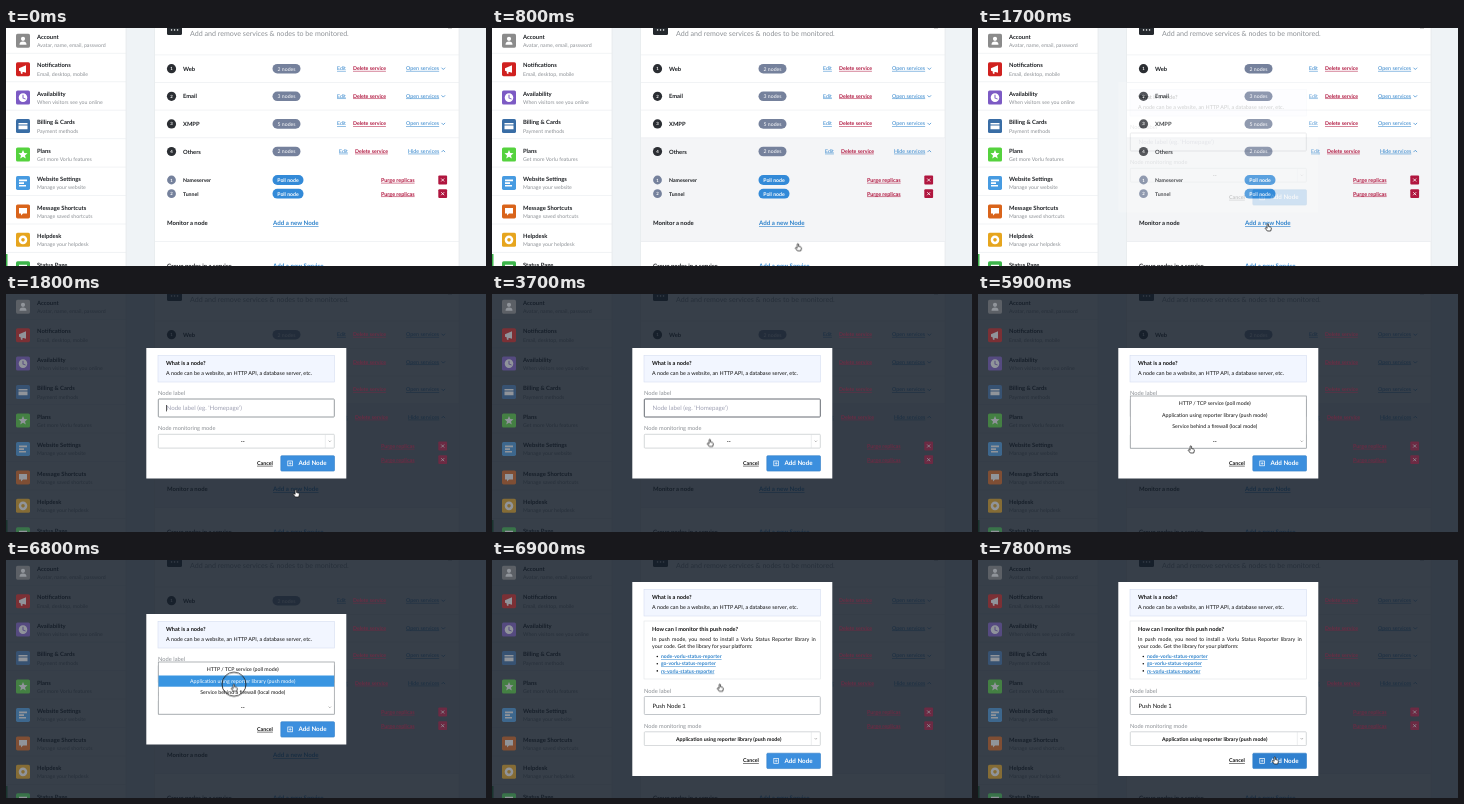
An HTML page for the animation above (8000 ms loop, 480x238 px).

```html
<!DOCTYPE html>
<html lang="en">
<head>
<meta charset="utf-8">
<title>Adding a node</title>
<style>
html, body { margin: 0; width: 100%; height: 100%; overflow: hidden; background: #eff3f6; }
svg { display: block; width: 100vw; height: 100vh; font-family: Lato, "Open Sans", sans-serif; text-rendering: geometricPrecision; }
.b { font-weight: 700; }
.u { text-decoration: underline; text-decoration-thickness: .45px; text-underline-offset: .8px; }
.m { text-anchor: middle; }

#hover, #shade, #modal, #lift, #box, #intro, #form, #extra, #list, #mark, #opt1, #opt2, #chosen, #empty,
#field, #submit, #ring, #hand { animation: 8s step-end infinite; }
#hover { animation-name: hover; }
#shade { animation-name: shade; }
#modal { animation-name: modal; }
#lift { animation-name: lift; }
#box { animation-name: box; }
#intro { animation-name: intro; }
#form { animation-name: form; }
#extra, #chosen { animation-name: late; }
#empty { animation-name: early; }
#list { animation-name: list; }
#mark { animation-name: mark; }
#opt1 { animation-name: opt1; }
#opt2 { animation-name: opt2; }
#field { animation-name: field; }
#submit { animation-name: submit; }
#ring { animation-name: ring; }
#hand { animation-name: hand; }
#pointer { animation: travel 8s ease-in-out infinite; }

@keyframes hover { 0% { opacity: 0 } 7.5%, to { opacity: 1 } }
@keyframes shade { 0% { opacity: 0 } 22.5%, to { opacity: 1 } }
@keyframes modal { 0% { opacity: 0 } 21.25% { opacity: .2 } 22.5%, to { opacity: 1 } }
@keyframes lift { 0% { opacity: 1 } 22.5%, to { opacity: .45 } }
@keyframes box { 0% { y: 54px; height: 130.5px } 86.25%, to { y: 22px; height: 194px } }
@keyframes intro { 0% { transform: none } 86.25%, to { transform: translateY(-32px) } }
@keyframes form { 0% { transform: none } 86.25%, to { transform: translateY(31.5px) } }
@keyframes late { 0% { opacity: 0 } 86.25%, to { opacity: 1 } }
@keyframes early { 0% { opacity: 1 } 86.25%, to { opacity: 0 } }
@keyframes list { 0% { opacity: 0 } 71.25% { opacity: 1 } 86.25%, to { opacity: 0 } }
@keyframes mark { 0% { opacity: 0; y: 126.8px } 79.4% { opacity: 1; y: 126.8px } 80.6%, to { opacity: 1; y: 115.5px } }
@keyframes opt1 { 0% { fill: #111 } 80.6%, to { fill: #fff } }
@keyframes opt2 { 0% { fill: #111 } 79.4% { fill: #fff } 80.6%, to { fill: #111 } }
@keyframes field { 0% { stroke: #8c9196 } 23.75% { stroke: #555b62 } 68.75%, to { stroke: #bcc0c4 } }
@keyframes submit { 0% { fill: #3c8fde } 95%, to { fill: #2f80cf } }
@keyframes ring {
  0% { opacity: 0 } 18.75% { opacity: 1 } 21.25% { opacity: 0 }
  68.75% { opacity: 1 } 71.25% { opacity: 0 }
  83.75% { opacity: 1 } 86.25%, to { opacity: 0 }
}
@keyframes hand { 0% { opacity: 1 } 50% { opacity: 0 } 65%, to { opacity: 1 } }
@keyframes travel {
  0%, 3.75% { transform: translate(330px, 245px) }
  15%, 25.6% { transform: translate(290px, 196px) }
  30%, 65% { transform: translate(218px, 145.5px) }
  68.75%, 77% { transform: translate(213px, 152px) }
  82.5%, 88.75% { transform: translate(228px, 124.3px) }
  97%, to { transform: translate(297px, 197px) }
}
</style>
</head>
<body>
<svg id="stage" viewBox="0 0 480 238" preserveAspectRatio="none"></svg>
<script>
const LOOP = 8000;
const BLUE = '#2f83cb', RED = '#b0163f', INK = '#1c1f23', GREY = '#8d9196';

const text = (x, y, s, size, fill = INK, cls = '', extra = '') =>
  `<text x="${x}" y="${y}" font-size="${size}" fill="${fill}" class="${cls}" ${extra}>${s}</text>`;
const rect = (x, y, w, h, fill, extra = '') =>
  `<rect x="${x}" y="${y}" width="${w}" height="${h}" fill="${fill}" ${extra}/>`;
const line = (x1, y, x2, color = '#e8ebee') =>
  `<path d="M${x1} ${y}H${x2}" stroke="${color}" stroke-width=".6"/>`;
const stroke = (d, color, width = .7) =>
  `<path d="${d}" fill="none" stroke="${color}" stroke-width="${width}"/>`;
const group = (id, body) => `<g id="${id}">${body}</g>`;

// White glyphs are drawn around the centre of each 14 px icon.
const menuItems = [
  ['Account', 'Avatar, name, email, password', '#8b8b8b', 'M-3.5 4Q-3.5 .8 0 .8T3.5 4ZM0-4A2.1 2.1 0 1 1 0 .2A2.1 2.1 0 1 1 0-4Z'],
  ['Notifications', 'Email, desktop, mobile', '#d0211f', 'M-4-1L3-4V3.5L-4 1.5ZM-2.5 2L-.5 2.5V4.5H-2Z'],
  ['Availability', 'When visitors see you online', '#7c5ac4', 'M0-4.3A4.3 4.3 0 1 1 0 4.3A4.3 4.3 0 1 1 0-4.3ZM-.5-2.8V.7L2.4 2L2.8 1.2L.5 .1V-2.8Z'],
  ['Billing &amp; Cards', 'Payment methods', '#396da5', 'M-4.5-3H4.5V-1.6H-4.5ZM-4.5-.5H4.5V3.2H-4.5Z'],
  ['Plans', 'Get more Vorlu features', '#55d23e', 'M0-4.5L1.3-1.4L4.5-1.2L2 .9L2.8 4.1L0 2.3L-2.8 4.1L-2 .9L-4.5-1.2L-1.3-1.4Z'],
  ['Website Settings', 'Manage your website', '#479be1', 'M-4-3.5H4V-1.7H-4ZM-4-.7H1V1H-4ZM-4 2H3V3.6H-4Z'],
  ['Message Shortcuts', 'Manage saved shortcuts', '#d9641b', 'M-4-3.3H4V2H0L-2 4V2H-4Z'],
  ['Helpdesk', 'Manage your helpdesk', '#e6a51e', 'M0-4.3A4.3 4.3 0 1 1 0 4.3A4.3 4.3 0 1 1 0-4.3ZM0-1.8A1.8 1.8 0 1 0 0 1.8A1.8 1.8 0 1 0 0-1.8Z'],
  ['Status Page', '', '#3db54b', 'M-4-3.5H4V-1.5H-4ZM-4 0H4V2H-4Z'],
];
const services = [['Web', 2], ['Email', 3], ['XMPP', 5], ['Others', 2]];

let page = rect(0, 0, 120, 238, '#fff') + rect(148.5, -2, 304.5, 242, '#fff', 'stroke="#dfe4e8" stroke-width=".6"');
let lift = ''; // parts that stay brighter under the shade
page += '<path d="M120 0V238" stroke="#dfe4e8" stroke-width=".6"/>';
page += group('hover', rect(149, 110, 304, 104, '#f4f5f7'));

menuItems.forEach(([title, note, color, glyph], i) => {
  const y = 12.7 + 28.45 * i;
  page += text(31, y - 1.7, title, 5.85, INK, 'b') + text(31, y + 6.5, note, 5.22, GREY) + line(0, y + 12.6, 120);
  lift += rect(10, y - 7, 14, 14, color, 'rx="1.6"') +
    `<path transform="translate(17 ${y})" d="${glyph}" fill="#fff" fill-rule="evenodd"/>`;
});
page += rect(0, 226, 1.5, 12, '#3db54b');

page += rect(161, -8, 15, 15, '#24282d', 'rx="1.5"') + [165.5, 168.5, 171.5].map(x => rect(x - .6, 1.3, 1.3, 1.3, '#fff')).join('');
page += text(184, 8.3, 'Add and remove services &amp; nodes to be monitored.', 7.1, GREY) + line(442, .2, 446, '#999');

const badge = (y, n, color, r) =>
  `<circle cx="165.5" cy="${y}" r="${r}" fill="${color}"/>` + text(165.5, y + 1.5, n, 4.3, '#fff', 'b m');
const pill = (y, s, w, fill, h) =>
  rect(266.5, y - h / 2, w, h, fill, `rx="${h / 2}"`) + text(266.5 + w / 2, y + 1.8, s, 5.15, '#fff', 'm' + (w > 30 ? ' b' : ''));

services.forEach(([label, count], i) => {
  const y = 40.7 + 27.6 * i, expanded = i === 3, shift = expanded ? 2 : 0;
  page += line(149, y - 13.8, 453) + badge(y, i + 1, '#2b2e33', 4.6) + text(177, y + 2, label, 5.8, INK, 'b') +
    pill(y, `${count} nodes`, 28, '#75819c', 9.6) +
    text(331 + shift, y + 1.2, 'Edit', 5.2, BLUE, 'u') +
    text(400 + shift, y + 1.2, expanded ? 'Hide services' : 'Open services', 5.35, BLUE, 'u') +
    stroke(expanded ? `M435.5 ${y + .6}l1.8-1.8l1.8 1.8` : `M435.5 ${y - 1}l1.8 1.8l1.8-1.8`, BLUE);
  lift += text(347 + shift, y + 1.2, 'Delete service', 5.2, RED, 'b u');
});

['Nameserver', 'Tunnel'].forEach((label, i) => {
  const y = 152 + 13.7 * i;
  page += badge(y, i + 1, '#75819c', 4.4) + text(177, y + 1.8, label, 5.2, INK, 'b') + pill(y, 'Poll node', 31, '#338ad8', 9.8);
  lift += text(375, y + 1.8, 'Purge replicas', 5.4, RED, 'b u') + rect(432.3, y - 4.4, 8.8, 8.8, RED, 'rx="1"') +
    stroke(`M435.2 ${y - 1.5}l3 3m0-3l-3 3`, '#fff', .8);
});

page += text(161, 197.2, 'Monitor a node', 5.95, INK, 'b') + text(267, 197.2, 'Add a new Node', 6.2, BLUE, 'b u') +
  line(149, 213.5, 453) + text(161, 240.2, 'Group nodes in a service', 5.95, INK, 'b') +
  text(267, 240.2, 'Add a new Service', 6.2, BLUE, 'b u');

const intro = rect(152, 61.3, 176.5, 26.7, '#f2f6ff', 'stroke="#d5def0" stroke-width=".6"') +
  text(160, 71.2, 'What is a node?', 5.6, '#111', 'b') +
  text(160, 81.2, 'A node can be a website, an HTTP API, a database server, etc.', 5.43, '#111');

const links = ['node', 'go', 'rs'].map((lang, i) => {
  const y = 98.2 + 7.2 * i;
  return `<circle cx="165.3" cy="${y - 1.7}" r=".8" fill="#111"/>` + text(169, y, `${lang}-vorlu-status-reporter`, 5.05, BLUE, 'b u');
}).join('');
const extra = rect(152, 61, 176.5, 58, '#fff', 'stroke="#e2e5e8" stroke-width=".6"') +
  text(160, 71, 'How can I monitor this push node?', 5.6, '#111', 'b') +
  text(160, 81, 'In push mode, you need to install a Vorlu Status Reporter library in', 5.3, '#111', '', 'word-spacing=".9"') +
  text(160, 88.2, 'your code. Get the library for your platform:', 5.27, '#111') + links;

const options = ['HTTP / TCP service (poll mode)', 'Application using reporter library (push mode)', 'Service behind a firewall (local mode)'];
const chevron = stroke('M322.6 146.6l1.2 1.2l1.2-1.2', '#888', .6);
const form = text(152, 101, 'Node label', 5.75, GREY) +
  rect(152.3, 105, 176, 18, '#fff', 'id="field" stroke="#8c9196" stroke-width=".9" rx=".8"') +
  text(160.5, 116.1, '', 6.2, GREY, '', 'id="entry"') +
  rect(160.2, 111, .7, 6.4, '#111', 'id="caret"') +
  text(152, 136, 'Node monitoring mode', 5.65, GREY) +
  rect(152.3, 140.3, 176, 13.8, '#fff', 'stroke="#c3c7cb" stroke-width=".7" rx=".8"') +
  stroke('M319.3 140.3V154', '#d8dbde', .5) + chevron +
  text(236.7, 148.8, '--', 5.3, '#111', 'b m', 'id="empty"') +
  text(236.7, 149, options[1], 5.2, '#111', 'b m', 'id="chosen"') +
  text(251, 170.8, 'Cancel', 5.3, '#111', 'b u') +
  rect(274.8, 161.7, 53.7, 15.4, '#3c8fde', 'id="submit" stroke="#2f7cc6" stroke-width=".6" rx="1"') +
  rect(281.8, 167, 4.8, 4.8, 'none', 'stroke="#fff" stroke-width=".7"') + stroke('M284.2 168v2.8m-1.4-1.4h2.8', '#fff', .6) +
  text(292.5, 171.4, 'Add Node', 6.25, '#fff', 'b');

const list = rect(152.3, 102, 176, 52.2, '#fff', 'stroke="#8f9499" stroke-width=".7"') +
  rect(152.5, 115.5, 175.7, 11.2, '#3995e1', 'id="mark"') +
  options.map((s, i) => text(236.7, 111.4 + 11.3 * i, s, 5.28, '#111', 'm', `id="opt${i}"`)).join('') +
  text(236.7, 148.8, '--', 5.3, '#111', 'b m') + chevron;

const hand = '<path d="M-.9 .2Q0-.6 .6 .4V2.6L2.6 3.1Q3.6 3.5 3.3 4.8L2.7 7H-.7L-2.8 4.3Q-2.6 3.3-1.5 3.9L-.9 4.4Z" fill="#fff" stroke="#111" stroke-width=".7"/>';

document.getElementById('stage').innerHTML = rect(0, 0, 480, 238, '#eff3f6') + page +
  group('shade', rect(0, 0, 480, 238, 'rgba(20,30,42,.85)')) + group('lift', lift) +
  group('modal', rect(140.3, 54, 200, 130.5, '#fff', 'id="box"') + group('intro', intro) + group('extra', extra) +
    group('form', form) + group('list', list)) +
  group('pointer', '<circle id="ring" r="12" fill="none" stroke="#222" stroke-width=".9"/>' + group('hand', hand));

const keys = [[4000, 'P'], [4200, 'u'], [4300, 's'], [4400, 'h'], [4500, '\u00a0'],
  [4600, 'N'], [4700, 'o'], [4800, 'd'], [4900, 'e'], [5000, '\u00a01']];
const entry = document.getElementById('entry');
const caret = document.getElementById('caret');
const clock = document.getElementById('pointer').getAnimations()[0];

function update() {
  const now = (clock?.currentTime ?? performance.now()) % LOOP;
  const typed = keys.filter(([at]) => now >= at).map(([, key]) => key).join('');
  const content = typed || "Node label (eg. 'Homepage')";
  if (entry.textContent !== content) {
    entry.textContent = content;
    entry.setAttribute('fill', typed ? '#111' : '#a0a2b4');
    entry.setAttribute('font-size', typed ? 5.9 : 6.2);
    caret.setAttribute('x', 160.2 + (typed ? entry.getComputedTextLength() + .3 : 0));
  }
  const blinkOn = Math.floor((now - 1700) / 500) % 2 === 0;
  caret.setAttribute('opacity', now < 5500 && (typed || blinkOn) ? 1 : 0);
  requestAnimationFrame(update);
}
update();
</script>
</body>
</html>
```
